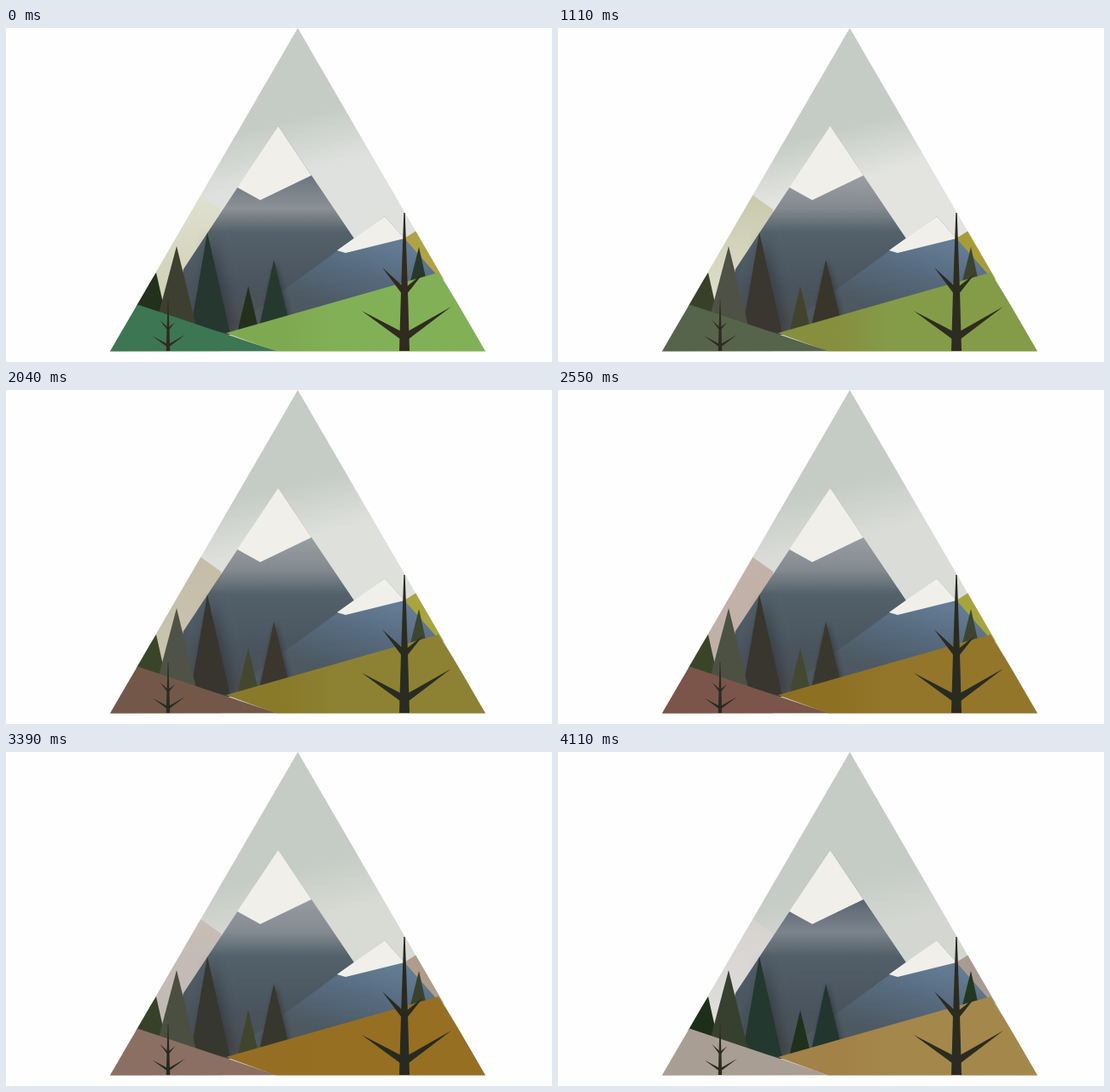
An HTML page with a canvas that plays this animation: 640 px wide and 392 px high, repeating every 4140 ms.

```html
<!DOCTYPE html>
<html lang="en">
<head>
<meta charset="utf-8">
<title>Mountain seasons</title>
<style>
html, body { margin: 0; width: 100%; height: 100%; overflow: hidden; background: #fefefe; }
canvas { display: block; width: 640px; height: 392px; }
</style>
</head>
<body>
<canvas id="stage" width="640" height="392"></canvas>
<script>
const ctx = document.getElementById('stage').getContext('2d');
const LOOP = 4140;
const TIMES = [0, 690, 1110, 1590, 2550, 3390, 4110];

// One value per entry in TIMES
const track = text => text.split(' ').map(hex =>
  [0, 2, 4].map(i => parseInt(hex.slice(i, i + 2), 16)));

const colors = {
  skyLow: track('dfe1de e2e3e0 e3e4e0 e2e3df dadcd7 d8dad4 d4d7d1'),
  farTop: track('dfe0d0 cdcdb2 c9c9ad c5c6a6 c4b2aa c8bdb7 d6d3cf'),
  farLow: track('d0d0b4 d5d6bc dedfcb d2d4b8 beb0a7 c0b9b4 dfdedb'),
  farRight: track('b1a344 a69c38 a69d39 a9a441 a6a53d b19b8a a99b91'),
  peakTop: track('6b7580 969ca1 999fa3 999fa3 989ea3 969ca2 5a6572'),
  peakMid: track('8b9194 858b90 838a8f 838a8f 838a8f 838a90 7c848c'),
  peakDark: track('55616a 53616b 53616b 53616b 53616b 53616b 535f68'),
  left: track('3d7653 3d7553 56644b 6b5b4a 7b554a 8b6f63 a99e93'),
  right: track('82b057 81ae56 849c48 888d3b 93762a 966f22 a4874b'),
  rightEdge: track('7fa951 84a84e 868f3e 868330 8d7022 966e23 a38247'),
  pineOlive: track('3d4030 46483d 4e5146 50534a 4d5144 4a4f42 37402f'),
  pineDeep: track('26372f 353733 39372f 37352e 38362e 36372e 23382f'),
  pineSmall: track('24301c 41422f 41442c 44472f 434830 40452e 1f311b'),
  pineMid: track('26392f 38362e 3a352a 3b372e 3a382e 38372d 22362f'),
  pineSide: track('22301c 2f3322 38402a 3a4429 394429 364128 1d2f18'),
  pineRight: track('27392a 3a4030 3d4330 3e4532 3d4532 39422f 22381f'),
  bare: track('302a20 33291f 2c2c20 2b2c21 292b20 272a20 2b2b21')
};
const skyStart = [108, 120, 118, 112, 112, 138, 152];

function position(t) {
  let i = 0;
  while (i < TIMES.length - 2 && t >= TIMES[i + 1]) i++;
  return [i, Math.min(1, (t - TIMES[i]) / (TIMES[i + 1] - TIMES[i]))];
}

const lerp = (a, b, k) => a + (b - a) * k;

function path(points) {
  ctx.beginPath();
  for (let i = 0; i < points.length; i += 2) ctx.lineTo(points[i], points[i + 1]);
  ctx.closePath();
}

function poly(fill, ...points) {
  path(points);
  ctx.fillStyle = fill;
  ctx.fill();
}

function gradient(x0, y0, x1, y1, ...stops) {
  const g = ctx.createLinearGradient(x0, y0, x1, y1);
  for (let i = 0; i < stops.length; i += 2) g.addColorStop(stops[i], stops[i + 1]);
  return g;
}

function pine(fill, blur, ...points) {
  ctx.save();
  ctx.shadowColor = 'rgba(35,38,40,0.5)';
  ctx.shadowBlur = blur;
  ctx.shadowOffsetX = blur / 3;
  poly(fill, ...points);
  ctx.restore();
}

function bareTree(fill, x, y, scale) {
  ctx.save();
  ctx.translate(x, y);
  ctx.scale(scale, scale);
  poly(fill, -0.7, -162, 0.7, -162, 4, -70, 6, 0, -6, 0, -4, -70);
  poly(fill, -50, -47, -4, -23, -5, -14);
  poly(fill, 55, -52, 4, -23, 5, -14);
  poly(fill, -26, -98, -2, -76, -3, -67);
  poly(fill, 22, -91, 2, -75, 3, -67);
  ctx.restore();
}

function draw(t) {
  const [i, k] = position(t);
  const c = {};
  for (const name in colors) {
    const a = colors[name][i], b = colors[name][i + 1];
    c[name] = `rgb(${a.map((v, n) => Math.round(lerp(v, b[n], k))).join()})`;
  }
  const skyY = lerp(skyStart[i], skyStart[i + 1], k);

  ctx.fillStyle = '#fefefe';
  ctx.fillRect(0, 0, 640, 392);
  ctx.save();
  path([342, 0, 562, 379.5, 122, 379.5]);
  ctx.clip();

  // Sky and distant slopes
  ctx.fillStyle = gradient(330, skyY, 346, skyY + 62, 0, '#c5ccc5', 1, c.skyLow);
  ctx.fillRect(0, 0, 640, 392);
  poly(gradient(0, 197, 0, 320, 0, c.farTop, 1, c.farLow),
    228, 196, 252, 213, 252, 380, 120, 380);
  poly(c.farRight, 465, 248, 481, 238, 520, 300, 505, 290);

  // Peaks
  poly(gradient(0, 173, 0, 357, 0, c.peakTop, 0.21, c.peakMid, 0.36, c.peakDark,
    0.7, '#49545e', 1, '#4b4e52'),
    319, 115, 408, 247, 408, 300, 262, 360, 190, 360, 208, 283);
  poly('#f0efea', 319, 115, 358, 173, 298, 202, 271, 187);
  poly(gradient(425, 247, 402, 335, 0, '#637b93', 0.45, '#566a7e', 1, '#4d5860'),
    444, 221, 467, 247, 506, 291, 262, 360, 288, 335);
  poly('#f0efea', 444, 221, 467, 247, 398, 264, 388, 261);

  // Pines
  pine(c.pineSide, 0, 176, 287, 187, 336, 150, 326);
  pine(c.pineDeep, 16, 236, 240, 263, 359, 217, 350);
  pine(c.pineOlive, 0, 200, 256, 223, 350, 179, 335);
  pine(c.pineMid, 6, 314, 272, 331, 341, 297, 350);
  pine(c.pineSmall, 0, 284, 303, 295.5, 351, 271, 357);
  pine(c.pineRight, 0, 484, 257, 492, 293, 474, 297);

  // Meadows
  poly(gradient(285, 0, 390, 0, 0, c.rightEdge, 0.4, c.rightEdge, 1, c.right),
    258, 358, 507, 287, 565, 380, 318, 380);
  poly(c.left, 154, 324.5, 318, 379.5, 120, 380);

  bareTree(c.bare, 467, 379, 1);
  bareTree(c.bare, 190, 379, 0.37);
  ctx.restore();
}

function frame(now) {
  draw(now % LOOP);
  requestAnimationFrame(frame);
}
draw(0);
requestAnimationFrame(frame);
</script>
</body>
</html>
```
